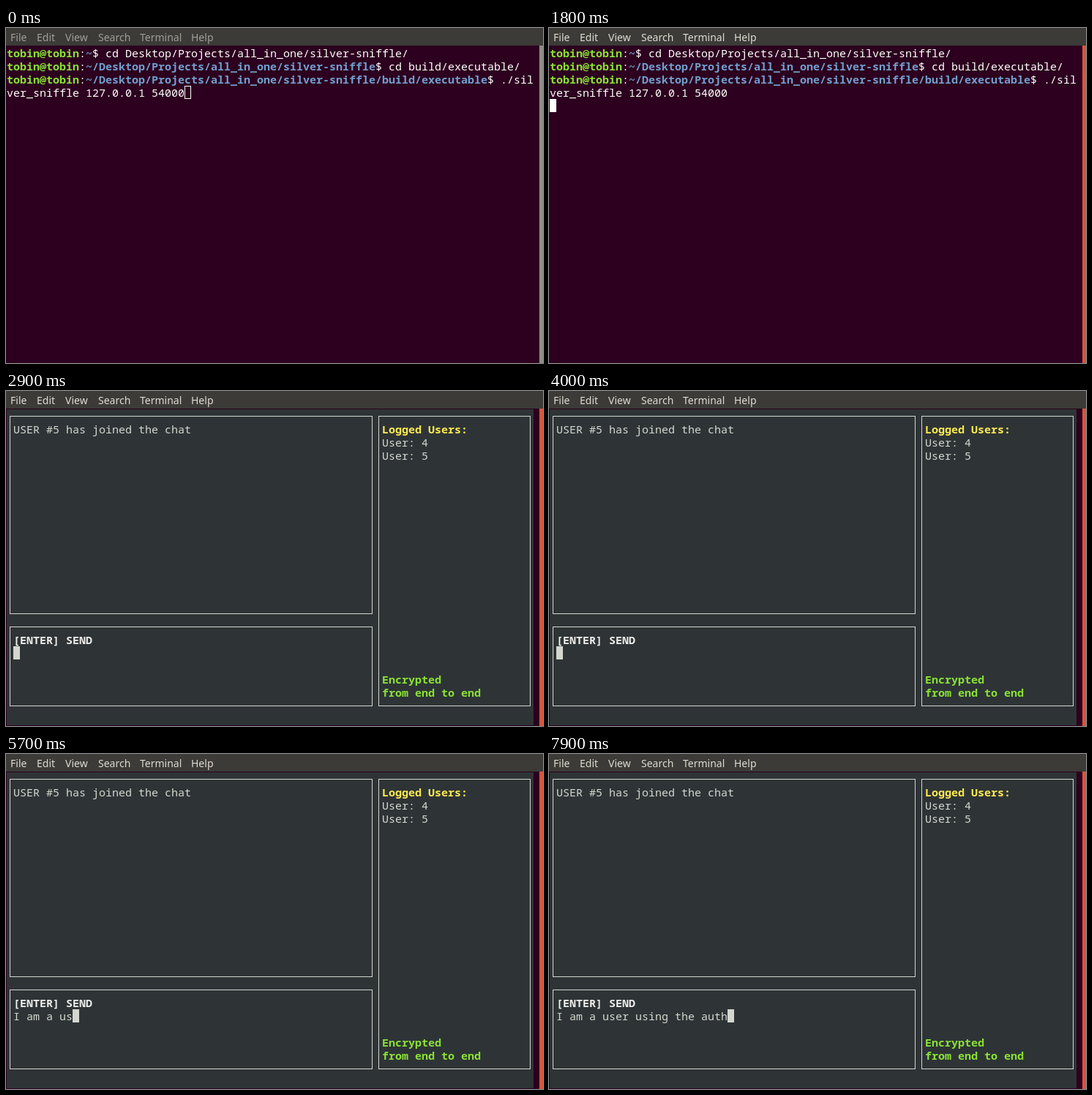
These frames come from a looping animation (734 px wide and 458 px high, 8000 ms). An HTML page with a canvas:

```html
<!DOCTYPE html>
<html lang="en">
<head>
<meta charset="utf-8">
<title>Terminal chat</title>
<style>
html, body { margin: 0; width: 100%; height: 100%; overflow: hidden; background: #2c001e; }
canvas { display: block; }
</style>
</head>
<body>
<canvas id="stage" width="734" height="458"></canvas>
<script>
const ctx = document.getElementById('stage').getContext('2d');
const LOOP = 8000, STEP = 100;
const FOCUS = 1200, ENTER = 1700, CLEAR = 1900, CHAT = 2000, TYPE = 4500, KEY = 129;
const CELL_W = 9, CELL_H = 18;
const PURPLE = '#2c001e', SLATE = '#2e3436', LIGHT = '#d3d7cf', WHITE = '#ffffff';
const GREEN = '#8ae234', BLUE = '#729fcf', YELLOW = '#fce94f';
const MENU = [['File', 6], ['Edit', 42], ['View', 81], ['Search', 126], ['Terminal', 183], ['Help', 253]];
const PROJECT = '~/Desktop/Projects/all_in_one/silver-sniffle';
const MESSAGE = 'I am a user using the auth';

const cellX = col => 1 + col * CELL_W;
const cellY = row => 25 + row * CELL_H;

function rect(color, x, y, w, h) {
  ctx.fillStyle = color;
  ctx.fillRect(x, y, w, h);
}

function frame(x, y, w, h) {
  ctx.strokeRect(x + 0.5, y + 0.5, w, h);
}

function write(text, col, row, color, bold) {
  ctx.font = `${bold ? 'bold ' : ''}15px "Noto Sans Mono", "DejaVu Sans Mono", monospace`;
  ctx.fillStyle = color;
  ctx.fillText(text, cellX(col), cellY(row) + 15);
}

function cursor(col, row, color, hollow) {
  if (hollow) {
    ctx.strokeStyle = color;
    frame(cellX(col), cellY(row), CELL_W - 1, CELL_H - 1);
  } else {
    rect(color, cellX(col), cellY(row), CELL_W, CELL_H);
  }
}

function prompt(row, path, command) {
  const user = 'tobin@tobin';
  let col = 0;
  const parts = [[user, GREEN, true], [':', WHITE], [path, BLUE, true], ['$ ' + command, WHITE]];
  for (const [text, color, bold] of parts) {
    write(text, col, row, color, bold);
    col += text.length;
  }
}

function drawWindow(focused) {
  rect(PURPLE, 0, 0, 734, 458);
  rect('#3c3b37', 0, 0, 734, 24);
  rect(focused ? '#d2573b' : '#8f8b87', 729, 24, 5, 434);
  ctx.font = '14px "Noto Sans", "Open Sans", sans-serif';
  ctx.fillStyle = focused ? '#dfdbd2' : '#a19e97';
  for (const [label, x] of MENU) ctx.fillText(label, x, 18);
}

function drawShell(t) {
  prompt(0, '~', 'cd Desktop/Projects/all_in_one/silver-sniffle/');
  prompt(1, PROJECT, 'cd build/executable/');
  prompt(2, PROJECT + '/build/executable', './sil');
  write('ver_sniffle 127.0.0.1 54000', 0, 3, WHITE);
  if (t < ENTER) cursor(27, 3, WHITE, t < FOCUS);
  else cursor(0, 4, WHITE);
}

function drawChat(t) {
  ctx.strokeStyle = LIGHT;
  frame(5, 34, 495, 270);
  frame(5, 322, 495, 108);
  frame(509, 34, 207, 396);
  write('USER #5 has joined the chat', 1, 1, LIGHT);
  write('Logged Users:', 57, 1, YELLOW, true);
  write('User: 4', 57, 2, LIGHT);
  write('User: 5', 57, 3, LIGHT);
  write('Encrypted', 57, 20, GREEN, true);
  write('from end to end', 57, 21, GREEN, true);
  write('[ENTER] SEND', 1, 17, '#eeeeec', true);
  const typed = MESSAGE.slice(0, Math.max(0, Math.floor((t - TYPE) / KEY)));
  write(typed, 1, 18, LIGHT);
  cursor(1 + typed.length, 18, LIGHT);
}

function draw(now) {
  const t = Math.floor((now % LOOP) / STEP) * STEP;
  ctx.lineWidth = 1;
  drawWindow(t >= FOCUS);
  if (t < CLEAR) {
    drawShell(t);
  } else {
    rect(SLATE, 1, 25, 720, 432);
    if (t < CHAT) cursor(0, 0, LIGHT);
    else drawChat(t);
  }
}

const start = performance.now();
function tick() {
  draw(performance.now() - start);
  requestAnimationFrame(tick);
}
tick();
</script>
</body>
</html>
```
